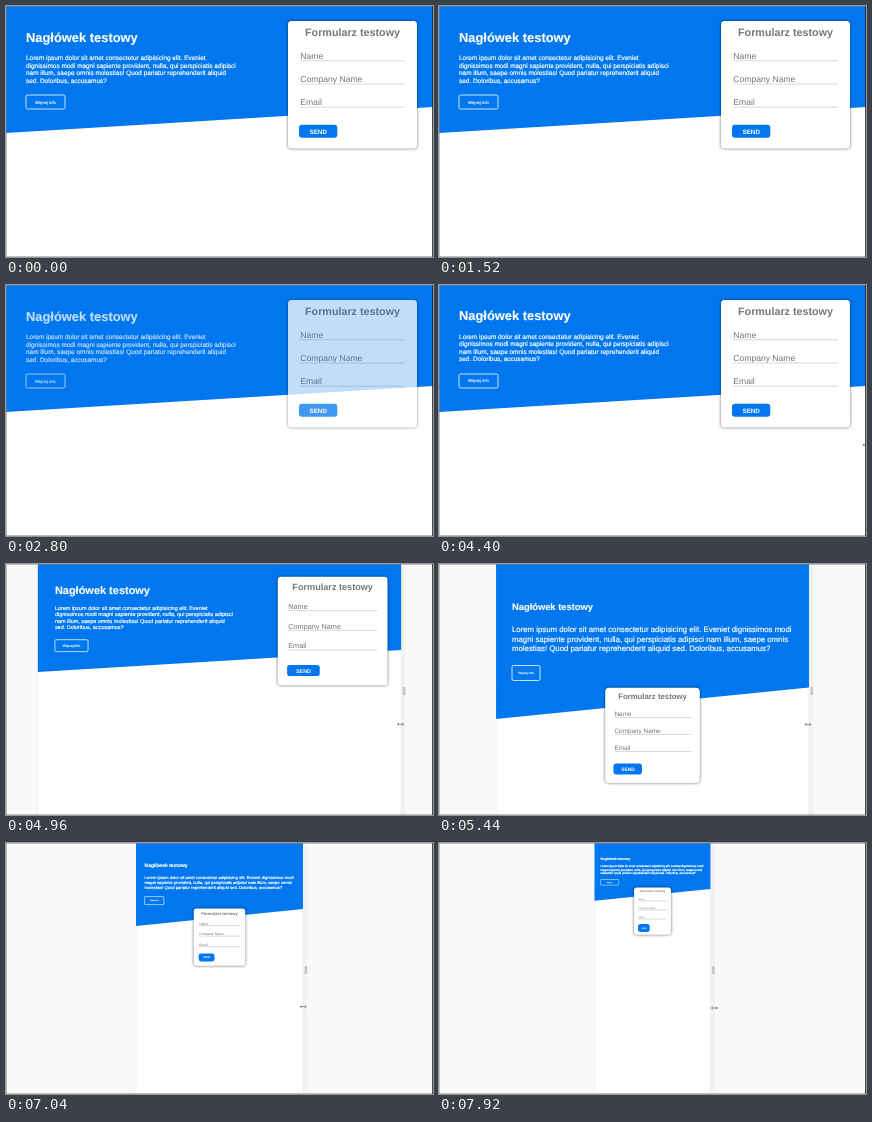
These frames come from a looping animation (427x251 px, 8 s). An HTML page:

```html
<!DOCTYPE html>
<html lang="pl">
<head>
<meta charset="utf-8">
<title>Formularz testowy</title>
<style>
  html, body { margin: 0; width: 100%; height: 100%; overflow: hidden; background: #fff; }
  svg { display: block; width: 100vw; height: 100vh; }
  text { font-family: "Liberation Sans", Arial, sans-serif; text-rendering: geometricPrecision; white-space: pre; }
  .bold { font-weight: 700; }
  .card { filter: drop-shadow(0 0 1.8px rgba(0, 0, 0, .6)); }
</style>
</head>
<body>
<svg id="stage" viewBox="0 0 427 251" preserveAspectRatio="none"></svg>
<script>
const LOOP = 8000, W = 427, H = 251, MID = 213.5;
const BLUE = '#0077ee';
const BREAKPOINT = 356;
const RELOAD = 2340, FADE = 1000;
const stage = document.getElementById('stage');

function set(el, attrs) {
  for (const k in attrs) el.setAttribute(k, attrs[k]);
  return el;
}
function add(parent, tag, attrs = {}, content = '') {
  const el = set(document.createElementNS('http://www.w3.org/2000/svg', tag), attrs);
  el.textContent = content;
  return parent.appendChild(el);
}

// Positions at each layout's reference width; everything scales with the page.
const wide = {
  width: 427, top: 0, left: 20, slope: [127, 101],
  head: { y: 35.5, size: 12.9 },
  body: { y: 54, gap: 7.5, size: 6.45, lines: [
    'Lorem ipsum dolor sit amet consectetur adipisicing elit. Eveniet',
    'dignissimos modi magni sapiente provident, nulla, qui perspiciatis adipisci',
    'nam illum, saepe omnis molestias! Quod pariatur reprehenderit aliquid',
    'sed. Doloribus, accusamus?'] },
  more: { y: 89, w: 39, h: 14, size: 4.3 },
  card: { x: 346.5, top: 15, bottom: 142.5, half: 64.5, r: 3.5 },
  title: { y: 30.3, size: 10.75 },
  field: { x: 294.3, end: 399, y: 52.8, gap: 23.2, line: 2, size: 8.6 },
  send: { x: 293, w: 38.3, y: 125.3, h: 13, size: 6.3, pad: 19.2 }
};
const narrow = {
  width: 313, top: .5, left: 73, slope: [154.5, 123],
  head: { y: 45.6, size: 9.35 },
  body: { y: 67.7, gap: 9.5, size: 7.81, lines: [
    'Lorem ipsum dolor sit amet consectetur adipisicing elit. Eveniet dignissimos modi',
    'magni sapiente provident, nulla, qui perspiciatis adipisci nam illum, saepe omnis',
    'molestias! Quod pariatur reprehenderit aliquid sed. Doloribus, accusamus?', ''] },
  more: { y: 101, w: 28, h: 15, size: 3.2 },
  card: { x: 213.5, top: 123.3, bottom: 218.5, half: 47.3, r: 4 },
  title: { y: 134.4, size: 7.8 },
  field: { x: 175.5, end: 252, y: 151.2, gap: 17, line: 1.8, size: 6.4 },
  send: { x: 174.4, w: 28.6, y: 204.6, h: 11, size: 4.9, pad: 14.5 }
};

add(stage, 'rect', { width: W, height: H, fill: '#f9f9f9' });
const gutter = add(stage, 'rect', { width: 4.5, height: H, fill: '#eff3f4' });
const paper = add(stage, 'rect', { height: H, fill: '#fff', stroke: '#e6e6e6', 'stroke-width': .5 });
const banner = add(stage, 'path', { fill: BLUE });

const intro = add(stage, 'g', { fill: '#fff', stroke: '#fff' });
const head = add(intro, 'text', { class: 'bold' }, 'Nagłówek testowy');
const body = wide.body.lines.map(() => add(intro, 'text'));
const more = add(intro, 'rect', { fill: 'none' });
const moreText = add(intro, 'text', { 'text-anchor': 'middle' }, 'Więcej info');

const form = add(stage, 'g');
const card = add(form, 'rect', { class: 'card', fill: '#fff' });
const title = add(form, 'text', { class: 'bold', fill: '#777', 'text-anchor': 'middle' }, 'Formularz testowy');
const fields = ['Name', 'Company Name', 'Email'].map(label => ({
  text: add(form, 'text', { fill: '#757575' }, label),
  line: add(form, 'path', { stroke: '#c8c8c8', 'stroke-width': .7 })
}));
const send = add(form, 'rect', { fill: BLUE });
const sendText = add(form, 'text', { class: 'bold', fill: '#fff', 'text-anchor': 'middle' }, 'SEND');

const grip = add(stage, 'rect', { y: 123, width: 2.6, height: 8, fill: '#c4c6c8' });
const cursor = add(stage, 'path', {
  d: 'M-3 0H3M-1.6 -1.3L-3 0L-1.6 1.3M1.6 -1.3L3 0L1.6 1.3',
  fill: 'none', stroke: '#555', 'stroke-width': .65
});
add(stage, 'path', { d: 'M0 .5H427M.5 0V251M0 250.5H427', stroke: '#8a8a8a', 'stroke-opacity': .5 });
add(stage, 'path', { d: 'M426.6 0V251', stroke: '#222', 'stroke-width': .9 });

const clamp = v => Math.max(0, Math.min(1, v));
function track(keys, t) {
  const i = keys.findIndex(k => k[0] > t);
  if (i === 0) return keys[0][1];
  if (i < 0) return keys[keys.length - 1][1];
  const [t0, a] = keys[i - 1], [t1, b] = keys[i];
  return a + (b - a) * (t - t0) / (t1 - t0);
}
const widthKeys = [[4400, 427], [5280, 327], [5440, 313], [6160, 263],
  [6320, 240], [7040, 167], [7920, 116], [8000, 112]];
const cursorX = [[4400, 0], [5440, -1], [6320, -3], [7920, 4]];
const cursorY = [[4400, 160], [5440, 160.5], [6320, 162.5], [7920, 165]];

function layout(w) {
  const L = w > BREAKPOINT ? wide : narrow;
  const s = w / L.width;
  // Minimum sizes spread the controls apart once the page gets small.
  const e = L === narrow && s < 1 ? (1 - s) ** 2 : 0;
  const X = x => MID + (x - MID) * s;
  const size = (v, extra = 0) => v * s + extra * e;
  const Y = (y, extra) => L.top + size(y, extra);
  const a = MID - w / 2, b = MID + w / 2;

  set(paper, { x: a, width: w });
  set(gutter, { x: b });
  set(grip, { x: b + 1.6 });
  set(banner, { d: `M${a} 0H${b}V${Y(L.slope[1])}L${a} ${Y(L.slope[0])}Z` });

  const left = X(L.left);
  set(head, { x: left, y: Y(L.head.y, -1.5), 'font-size': L.head.size * s, 'stroke-width': .15 });
  body.forEach((el, i) => {
    el.textContent = L.body.lines[i];
    set(el, { x: left, y: Y(L.body.y + i * L.body.gap, -3),
      'font-size': L.body.size * s, 'stroke-width': .2 });
  });
  const m = L.more, mw = size(m.w, 20), my = Y(m.y, -3.5);
  set(more, { x: left, y: my, width: mw, height: m.h * s, rx: 1.5 * s, 'stroke-width': .8 * Math.sqrt(s) });
  set(moreText, { x: left + mw / 2, y: my + (m.h / 2 + m.size * .35) * s,
    'font-size': m.size * s, 'stroke-width': .12 });

  const c = L.card, cx = X(c.x), half = size(c.half, 2.3), top = Y(c.top, -4);
  set(card, { x: cx - half, y: top, width: 2 * half, height: Y(c.bottom, 26) - top, rx: size(c.r, 3) });
  set(title, { x: cx, y: Y(L.title.y, -2.5), 'font-size': L.title.size * s });
  const f = L.field;
  fields.forEach(({ text, line }, i) => {
    const y = Y(f.y + i * f.gap, 2.2 + 6.8 * i);
    set(text, { x: X(f.x), y, 'font-size': f.size * s });
    set(line, { d: `M${X(f.x)} ${y + f.line * s}H${X(f.end)}` });
  });
  const n = L.send, sh = size(n.h, 10), sy = Y(n.y, 22);
  set(send, { x: X(n.x), y: sy - sh / 2, width: size(n.w, 3), height: sh, rx: size(3, 4) });
  set(sendText, { x: X(n.x) + size(n.pad, 1.5), y: sy + n.size * .36 * s, 'font-size': size(n.size, .7) });
  return b;
}

function draw(t) {
  const edge = layout(track(widthKeys, t));

  // The page reloads and its content fades in on the spot.
  const p = clamp((t - RELOAD) / FADE);
  const opacity = t < RELOAD ? 1 : 1 - (1 - p) ** 2.25;
  set(intro, { opacity });
  set(form, { opacity });

  set(grip, { opacity: t > 4400 ? 1 : 0 });
  set(cursor, { opacity: t >= 4400 ? 1 : 0,
    transform: `translate(${edge + track(cursorX, t)} ${track(cursorY, t)})` });
}

const start = performance.now();
function tick() {
  draw((performance.now() - start) % LOOP);
  requestAnimationFrame(tick);
}
draw(0);
requestAnimationFrame(tick);
</script>
</body>
</html>
```
